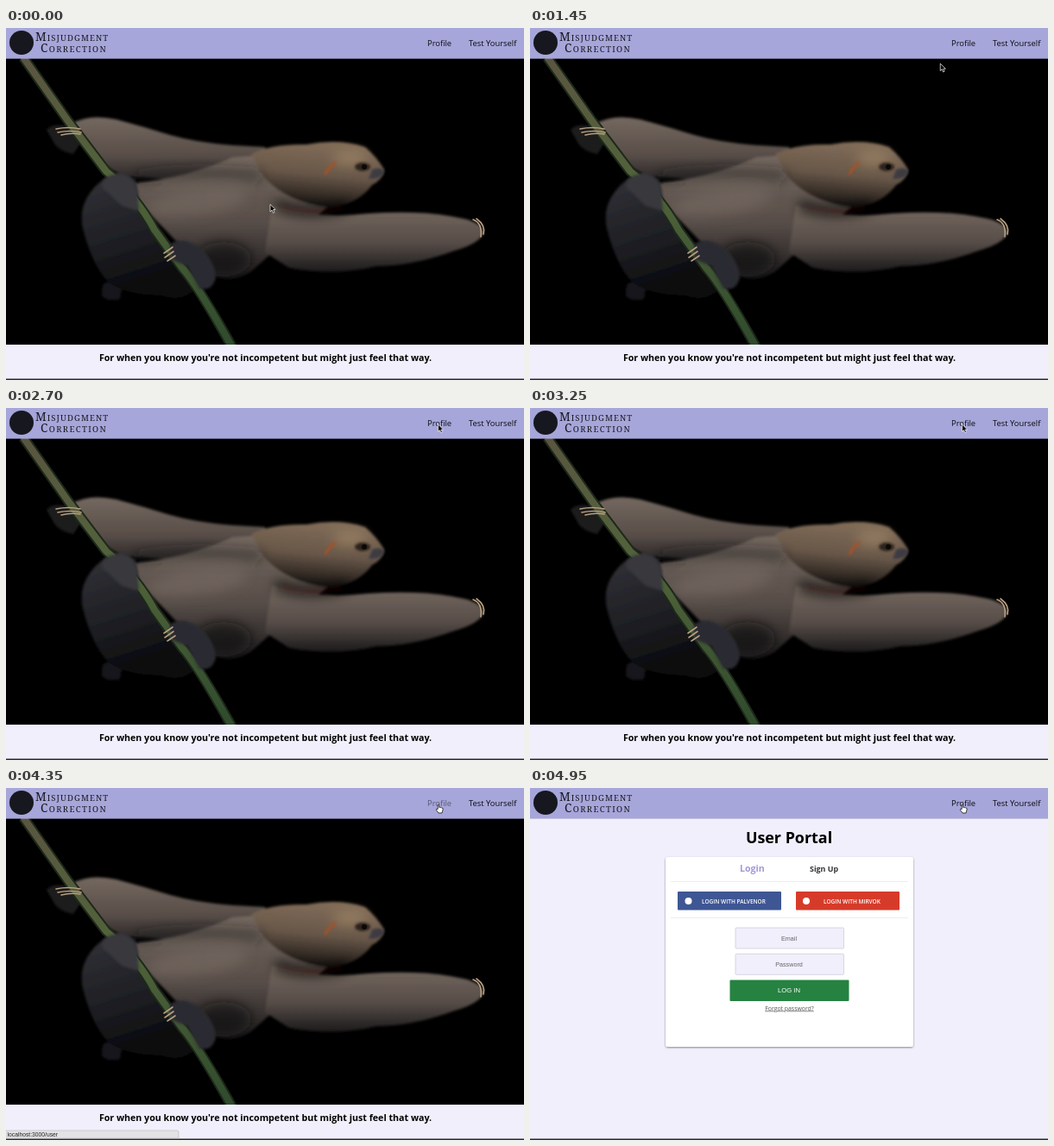
These frames come from a looping animation (600 by 408 pixels, 5 s). An HTML page:

```html
<!DOCTYPE html>
<html lang="en">
<head>
<meta charset="utf-8">
<title>User portal demo</title>
<style>
  html, body { margin: 0; width: 100%; height: 100%; overflow: hidden; background: #f1effc; }
  svg { display: block; width: 600px; height: 408px; }
  text { font-family: "Open Sans", sans-serif; }
  .brand { font: 500 9.5px "Noto Serif", serif; fill: #17171f; }
  .cap { font-size: 13.5px; }
  .nav { font-size: 9.4px; fill: #0c0c14; }
  .bold { font-weight: 700; }
  .mid { text-anchor: middle; }
  .social { font-size: 6.5px; font-weight: 600; fill: #fff; }
  .field { font: 7.2px "Liberation Sans", Arial, sans-serif; fill: #666; }
  .action { font: 7.7px "Liberation Sans", Arial, sans-serif; fill: #fff; }
  .status { font: 6.75px "Liberation Sans", Arial, sans-serif; fill: #222; }
</style>
</head>
<body>
<svg viewBox="0 0 600 408">
  <defs>
    <clipPath id="frame"><rect y="35" width="600" height="332"/></clipPath>
    <filter id="soft" x="-10%" y="-10%" width="120%" height="120%"><feGaussianBlur stdDeviation="1.8"/></filter>
    <filter id="haze" x="-30%" y="-30%" width="160%" height="160%"><feGaussianBlur stdDeviation="7"/></filter>
    <filter id="shadow"><feDropShadow dx="0" dy="1" stdDeviation="1" flood-opacity=".45"/></filter>
    <linearGradient id="fur" x1="0" y1="0" x2="0" y2="1">
      <stop offset="0" stop-color="#74685f"/><stop offset=".55" stop-color="#574d48"/><stop offset="1" stop-color="#1c1a1c"/>
    </linearGradient>
    <linearGradient id="rump" x1="0" y1="0" x2=".3" y2="1">
      <stop offset="0" stop-color="#333338"/><stop offset=".6" stop-color="#1d1e23"/><stop offset="1" stop-color="#09090b"/>
    </linearGradient>
    <linearGradient id="head" x1=".65" y1="0" x2=".45" y2="1">
      <stop offset="0" stop-color="#826d58"/><stop offset=".5" stop-color="#685749"/><stop offset="1" stop-color="#14110f"/>
    </linearGradient>
    <linearGradient id="bark" x1="0" y1="36" x2="0" y2="366" gradientUnits="userSpaceOnUse">
      <stop offset="0" stop-color="#5a5540"/><stop offset=".45" stop-color="#51633a"/><stop offset="1" stop-color="#2f4b2c"/>
    </linearGradient>
  </defs>

  <rect width="600" height="408" fill="#f1effc"/>

  <g id="home">
    <g clip-path="url(#frame)">
      <rect y="35" width="600" height="332" fill="#000"/>
      <g filter="url(#soft)">
        <path fill="#1d1c1f" d="M47 118Q53 111 68 113L90 128L78 146Q62 143 56 134Z"/>
        <path fill="#17171a" d="M112 298Q120 290 134 302L132 314Q118 318 111 310Z"/>
        <path fill="url(#fur)" d="M76 111Q96 99 128 106Q158 114 190 124Q232 136 300 138L310 180L230 184Q180 172 138 172Q112 162 92 136Z"/>
        <path fill="url(#fur)" d="M148 180Q210 174 262 150L320 146L372 208L328 244Q306 262 284 282Q262 296 240 287L196 246L156 204Z"/>
        <path fill="url(#rump)" d="M112 176Q130 162 150 176L156 206L190 248L222 300Q204 320 180 310Q142 310 120 296Q100 276 89 232Q82 200 112 176Z"/>
        <path fill="url(#fur)" d="M308 206Q360 222 420 215Q488 211 530 221Q552 226 553 238Q548 250 520 258Q470 276 430 276Q380 288 328 278L300 260Z"/>
        <path fill="url(#head)" d="M284 146Q308 134 348 135Q386 128 416 138Q430 150 438 164Q436 176 424 182Q406 206 372 208Q326 202 300 174Z"/>
      </g>
      <g filter="url(#haze)">
        <ellipse cx="222" cy="202" rx="58" ry="15" fill="#7b6f66" opacity=".5" transform="rotate(-8 222 202)"/>
        <ellipse cx="252" cy="268" rx="32" ry="20" fill="#121011" opacity=".7"/>
        <path d="M312 205Q350 220 396 206" stroke="#0a0808" stroke-width="11" fill="none" opacity=".8"/>
        <path d="M150 174Q212 162 296 172" stroke="#211e1e" stroke-width="10" fill="none" opacity=".6"/>
        <ellipse cx="398" cy="151" rx="20" ry="8" fill="#a98d6c" opacity=".6"/>
      </g>
      <path d="M20 34L72 108L116 166Q152 196 172 234L204 278Q222 298 262 370" fill="none" stroke="#1d291a" stroke-width="12"/>
      <path d="M20 34L72 108L116 166Q152 196 172 234L204 278Q222 298 262 370" fill="none" stroke="url(#bark)" stroke-width="8"/>
      <g filter="url(#soft)">
        <path fill="#39383c" d="M111 184Q113 169 132 169Q151 173 152 190L154 212L134 206Z"/>
        <path fill="#2c2c31" d="M190 251Q204 240 224 254Q242 270 243 290Q238 306 224 302L210 276L190 268Z"/>
        <path d="M370 170Q374 160 382 156" stroke="#a95027" stroke-width="3" fill="none"/>
        <ellipse cx="413" cy="161" rx="9" ry="5" fill="#2a211b"/>
        <path fill="#3c3b42" d="M424 164Q434 160 438 166Q437 175 420 175Z"/>
      </g>
      <circle cx="415" cy="161" r="3" fill="#0b0908"/>
      <g fill="none" stroke="#b89f82" stroke-width="1.6" stroke-linecap="round">
        <path d="M58 117Q72 114 86 117M60 121Q74 118 87 121M64 124Q76 121 86 123"/>
        <path d="M183 261L193 254M184 266L194 259M187 270L196 264"/>
        <path d="M541 222Q552 226 550 242M545 221Q556 229 553 239"/>
      </g>
    </g>
    <text class="bold mid" x="300.5" y="386" font-size="10.66">For when you know you're not incompetent but might just feel that way.</text>
  </g>

  <g id="portal">
    <text class="bold mid" x="300" y="64" font-size="17.9">User Portal</text>
    <rect x="157" y="80" width="287" height="220" rx="3" fill="#fff" filter="url(#shadow)"/>
    <path d="M163 108.5H438M163 150.5H438" stroke="#ededf0"/>
    <text class="bold" x="243" y="96.5" font-size="10.6" fill="#a099d8">Login</text>
    <text class="bold" x="324" y="96.5" font-size="8.9" fill="#333">Sign Up</text>
    <rect x="171" y="120" width="120" height="21.5" rx="1" fill="#3f5694"/>
    <rect x="308" y="120" width="120" height="21.5" rx="1" fill="#d63b2a"/>
    <text class="social mid" x="236" y="133.5">LOGIN WITH PALVENOR</text>
    <text class="social mid" x="373" y="133.5">LOGIN WITH MIRVOK</text>
    <g id="icons" fill="#fff"><circle cx="183.5" cy="131" r="4"/><circle cx="320" cy="131" r="4"/></g>
    <g id="login"></g>
    <text class="mid" x="300.5" y="257.5" font-size="6.9" fill="#555" text-decoration="underline">Forgot password?</text>
    <g id="signup"><rect x="163" y="301" width="276" height="105" fill="#fff"/></g>
  </g>

  <rect width="600" height="35.6" fill="#a6a6da"/>
  <circle cx="18" cy="17" r="14" fill="#17171f"/>
  <text class="brand" x="34" y="15" letter-spacing="1.1"><tspan class="cap">M</tspan>ISJUDGMENT</text>
  <text class="brand" x="40" y="28" letter-spacing="1.4"><tspan class="cap">C</tspan>ORRECTION</text>
  <text class="nav" id="profile" x="488" y="21">Profile</text>
  <text class="nav" x="536" y="21">Test Yourself</text>

  <rect y="406" width="600" height="1" fill="#8b8994"/>
  <rect y="407" width="600" height="1" fill="#29272f"/>
  <g id="status">
    <path d="M0 397H198Q200 397 200 399V406H0Z" fill="#e3e3e5" stroke="#b5b5b8" stroke-width=".6"/>
    <text class="status" x="1.5" y="404">localhost:3000/user</text>
  </g>

  <path id="arrow" d="M0 0V8.4L2 6.6L3.4 9.8L4.9 9.1L3.5 6H6.1Z" fill="#000" stroke="#fff" stroke-width=".7"/>
  <path id="hand" transform="translate(498 18.5)" fill="#fff" stroke="#111" stroke-width=".8" stroke-linejoin="round"
    d="M2.2 6V1Q3 -.2 3.8 1V4Q5 3.2 5.4 4.3Q6.6 3.7 6.9 4.8Q8.2 4.4 8.2 5.8L7.6 8.2L7 10.5H3L.4 7Q0 5.2 2.2 6Z"/>
</svg>

<script>
  const el = id => document.getElementById(id);
  const show = (id, on) => { el(id).style.display = on ? "" : "none"; };

  const LOOP = 5000, MOVE_START = 100, MOVE_END = 2000;
  const HOVER = 3750, STATUS = 3900, PAGE = 4400, STYLED = 4600;

  // Bezier points of the arrow tip
  const routeX = [306, 379, 470, 500.5], routeY = [204.5, 187, 30, 19];

  const clamp = v => Math.max(0, Math.min(1, v));
  const bezier = ([a, b, c, d], u) => {
    const v = 1 - u;
    return a * v ** 3 + 3 * b * v * v * u + 3 * c * v * u * u + d * u ** 3;
  };

  function addForm(id, top, labels, action) {
    let html = "";
    labels.forEach((label, i) => {
      const y = top + i * 30.3;
      html += `<rect x="238" y="${y}" width="125.5" height="24" rx="1" fill="#f0effb" stroke="#cfcfda" stroke-width=".8"/>
        <text class="field mid" x="300" y="${y + 14.5}">${label}</text>`;
    });
    const y = top + labels.length * 30.3 - .2;
    html += `<rect x="231.5" y="${y}" width="138" height="24.5" rx="1" fill="#258241"/>
      <text class="action mid" x="300" y="${y + 15}">${action}</text>`;
    el(id).innerHTML += html;
  }

  function draw(now) {
    const t = now % LOOP, hover = t >= HOVER, page = t >= PAGE;
    show("home", !page);
    show("portal", page);
    show("icons", t >= STYLED);
    show("signup", t < STYLED);
    show("status", t >= STATUS && t < STYLED);
    show("arrow", !hover);
    show("hand", hover);

    const k = clamp((t - MOVE_START) / (MOVE_END - MOVE_START));
    const u = k * k * (3 - 2 * k);
    el("arrow").setAttribute("transform", `translate(${bezier(routeX, u)} ${bezier(routeY, u)})`);

    el("profile").style.opacity = page ? 1 : 1 - .5 * clamp((t - HOVER) / 200);
    requestAnimationFrame(() => draw(performance.now()));
  }

  addForm("login", 162, ["Email", "Password"], "LOG IN");
  addForm("signup", 284.7, ["Name", "Email", "Password"], "SIGN UP");
  draw(performance.now());
</script>
</body>
</html>
```
